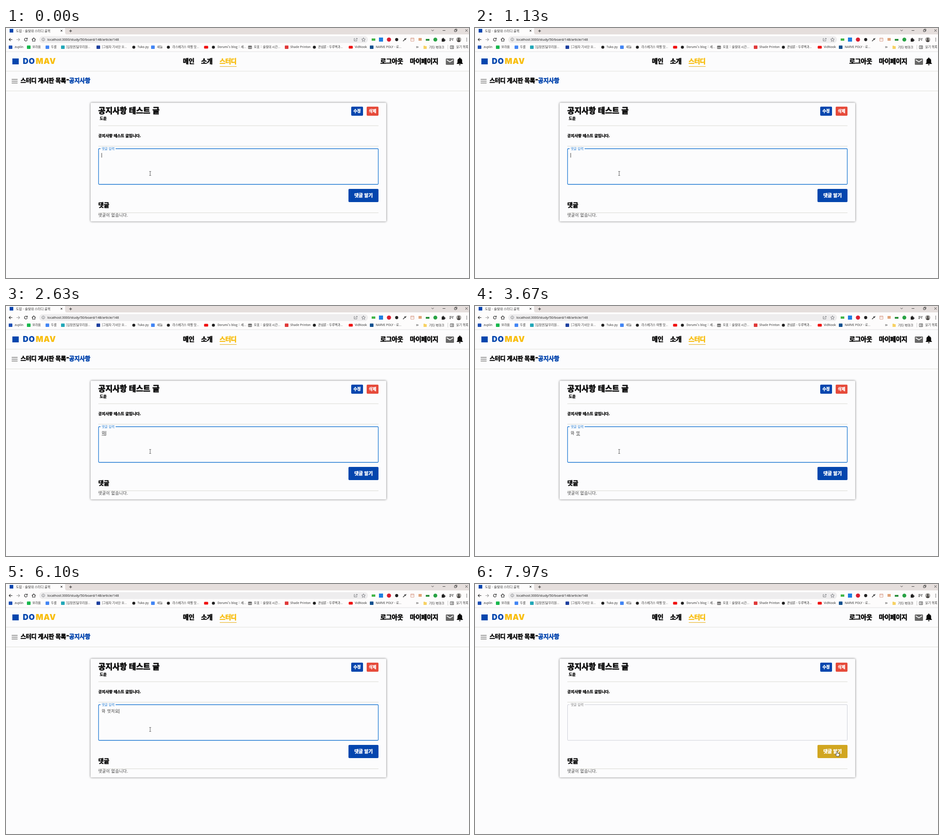
An HTML page that plays this animation: 1018 by 550 pixels, repeating every 8 s.

```html
<!DOCTYPE html>
<html lang="ko">
<head>
<meta charset="utf-8">
<title>스터디 게시판</title>
<style>
html, body { margin: 0; width: 100%; height: 100%; overflow: hidden; background: #fcfcfd; }
svg { display: block; width: 100vw; height: 100vh; }
text { font-family: "Noto Sans CJK KR", "Noto Sans CJK", sans-serif; white-space: pre; }
.url { font-family: "Noto Sans", sans-serif; }
.brand { font-family: Inter, sans-serif; }
.card { filter: drop-shadow(0 0 2.2px rgba(0, 0, 0, .55)); }
</style>
</head>
<body>
<svg id="stage" viewBox="0 0 1018 550"></svg>
<script>
const stage = document.getElementById('stage');
const BLUE = '#0446ae', GOLD = '#f8bd0c', INK = '#0c0c0c', GREY = '#5f6368';

function add(tag, attrs, parent = stage) {
  const el = document.createElementNS('http://www.w3.org/2000/svg', tag);
  for (const k in attrs) el.setAttribute(k, attrs[k]);
  parent.appendChild(el);
  return el;
}
const rect = (x, y, width, height, fill, rx = 0, more) => add('rect', { x, y, width, height, fill, rx, ...more });
const dot = (cx, cy, r, fill) => add('circle', { cx, cy, r, fill });
const path = (d, stroke, width = 1, fill = 'none', parent) => add('path', { d, stroke, 'stroke-width': width, fill }, parent);
// y is the middle of the line of text
function label(x, y, str, size, fill = INK, weight = 400, gap = 0, more) {
  const el = add('text', { x, y: y + size * .37, 'font-size': size, fill, 'font-weight': weight, 'letter-spacing': gap, ...more });
  el.textContent = str;
  return el;
}
// display lettering, thickened with an outline
const heavy = (x, y, str, size, fill = INK, gap = 0) =>
  label(x, y, str, size, fill, 900, gap, { stroke: fill, 'stroke-width': size * .05, 'stroke-linejoin': 'round' });

function drawBrowser() {
  rect(0, 0, 1018, 52, '#fdfcfc');
  path('M130 0H1018V14H134Q130 14 130 10Z', 'none', 0, '#e5dedc');
  rect(8, 2, 8, 8, BLUE);
  label(22, 6, '도맙 - 솔빛대 스터디 골목', 7.1, '#333');
  path('M120 4l4 4m0-4l-4 4M139 6.500h6m-3-3v6', '#222', 1);
  path('M935.500 4l2.500 2.500 2.500-2.500M960 5.500h6M986 4h4v4h-4zM987.500 4v-1.500h4v4h-1.500M1010 3l5 5m0-5l-5 5', '#333', .9);

  path('M14 25.500H7m3-3.200l-3.200 3.200 3.200 3.200', '#222', 1.1);
  path('M23 25.500h7m-3-3.200l3.200 3.200-3.200 3.200', '#999', 1.1);
  path('M46 23.200a3.200 3.200 0 1 0 .8 3M47 21.500v2.800h-2.800', '#222', 1.1);
  path('M57 25.500l4-3.700 4 3.700M58.300 25v4h5.400v-4', '#222', 1.1);
  rect(73, 18, 723, 15, '#eeedee', 7.5);
  path('M82 22a3.200 3.200 0 1 0 .01 0M82 24.800v2.200M82 23.400v.7', GREY, .8);
  label(91, 25, 'localhost:3000/study/50/board/148/article/148', 7.2, '#222', 400, 0, { class: 'url' });
  path('M767 23h-1.500v5.500h6v-2M768 26.500q0-3 4.500-3m-1.800-1.800l2 1.800-2 1.800', GREY, .8);
  path('M786 21.500l1.200 2.700 2.900.3-2.200 2 .7 2.900-2.600-1.500-2.600 1.500.7-2.900-2.200-2 2.900-.3z', GREY, .8);

  rect(804, 23, 8, 5, '#43b649');
  rect(820, 21, 9, 9, '#1f7fe0');
  dot(842, 25.500, 4.600, '#d81f32');
  dot(859, 25.500, 3.400, '#222');
  path('M873 29l4-4M876 23l3 3M878 24.500l2-2', '#333', 1.500);
  path('M890 22h7v7h-7zM890 24h7', '#d79a85', 1);
  rect(907, 22, 7, 6, '#e0a479');
  rect(923, 24, 8, 4, '#2b8f3c');
  dot(944, 25.500, 4.300, '#27a243');
  path('M958 23.500h2q-.5-2 1.200-2t1.200 2h2v2q2-.4 2 1.200t-2 1.200v2h-6.400z', 'none', 0, '#222');
  path('M975 23h5m-5 2.300h5m-5 2.300h3M982 28v-5h2', '#333', 1.1);
  dot(995.500, 25.500, 5.500, '#a9a7a4');
  dot(995.500, 24, 2, '#4a4644');
  path('M992 29.700q0-3.500 3.500-3.500t3.500 3.500q-3.500 2.400-7 0', 'none', 0, '#4a4644');
  for (const y of [22.5, 25.5, 28.5]) dot(1013, y, .85, '#333');
}

function drawBookmarks() {
  const RED = '#f00d0d', BLACK = '#222';
  const marks = [
    [10, '#1d4fb5', 19, 'zuplin'], [50, '#16b74c', 58, '보라움'], [91, '#4285f4', 99, '두룸'],
    [125, '#22a7b8', 132, '[입장권]달무리원...'], [203, '#1d3f9e', 211, '[그림자 기사단 오...'],
    [281, BLACK, 289, 'Tuko.py'], [323, '#4285f4', 332, '새늘'], [357, BLACK, 366, '라스베가스 여행 맛...'],
    [440, RED, 0, ''], [456, BLACK, 465, 'Dorumi\'s blog :: 세...'], [536, '', 545, '모표 :: 솔빛대 시간...'],
    [617, '#e03838', 625, 'Shade Printon'], [678, BLACK, 686, '관념론 - 두루백과...'],
    [758, RED, 767, 'VidNook'], [804, '#12508f', 813, 'NARVE POLY - 로...']
  ];
  for (const [ix, fill, x, name] of marks) {
    if (!fill) path('M533 39.500h7v6h-7zM533 41.500h7M535.300 39v6.500M537.700 39v6.500', '#333', .9);
    else if (fill === RED) rect(ix - 4.500, 39.300, 9, 6, fill, 1.5);
    else if (fill === BLACK) dot(ix, 42.300, 3.300, fill);
    else rect(ix - 4, 38.500, 8, 7.500, fill, 1);
    label(x, 42, name, 6.7, '#333');
  }
  path('M902 40l2 2-2 2M904.500 40l2 2-2 2', '#222', .9);
  path('M918 39h3l1 1h3v6h-7z', 'none', 0, '#f7d264');
  label(930, 42, '기타 북마크', 6.9, '#333');
  path('M971.500 37v10', '#ccc', 1);
  path('M977 39h7v6.500h-7zM979 41h4M979 43.300h4', '#333', .9);
  label(990, 42, '읽기 목록', 6.7, '#333');
  rect(0, 51.500, 1018, 1, '#dfe0e2');
}

function drawPage() {
  rect(14, 67, 14, 13, BLUE);
  const logo = { class: 'brand' };
  label(37, 73, 'DO', 17, BLUE, 900, .8, logo);
  label(65.500, 73, 'MAV', 17, GOLD, 900, 1, logo);
  heavy(389, 73, '메인', 14, INK, -.4);
  heavy(429, 73, '소개', 14, INK, -.4);
  heavy(469.500, 73, '스터디', 14, GOLD, -.45);
  rect(470, 84, 37, 1.2, '#e8b62c');
  heavy(823, 73, '로그아웃', 14, INK, -.4);
  heavy(888, 73, '마이페이지', 14, INK, -.45);
  rect(967, 67, 18, 14, '#686868', 1.500);
  path('M969 70l7 4.500 7-4.500', '#fff', 1.500);
  path('M991 79v-1l1.700-1.700v-4.500q0-4 3.800-4.800v-.7q0-1.300 1.300-1.300t1.300 1.300v.7q3.800.8 3.800 4.800v4.500l1.700 1.700v1zM996 80h3.600q-.2 2-1.800 2t-1.800-2', 'none', 0, '#080808');
  rect(0, 94.500, 1018, 1, '#e0e0dc');
  path('M12.500 113h13M12.500 117h13M12.500 121h13', '#777', 1.3);
  heavy(32, 115.500, '스터디 게시판 목록', 13, INK, -.3);
  heavy(132.500, 114, '-', 17);
  heavy(138.500, 115.500, '공지사항', 13, BLUE, -.3);
  rect(0, 138, 1018, 1, '#deded9');

  rect(186, 164.500, 650, 261, '#fcfcfd', 2, { class: 'card' });
  heavy(203, 182, '공지사항 테스트 글', 17);
  heavy(206, 199, '도윤', 8.3);
  rect(759, 173, 26, 20, BLUE, 2);
  heavy(764, 183, '수정', 8.7, '#fff');
  rect(793, 173, 26, 20, '#e64b3b', 2);
  heavy(798, 183, '삭제', 8.7, '#fff');
  for (const y of [214.5, 259.5, 406]) rect(203, y, 616, 1, '#d9d9d2');
  heavy(203, 236.500, '공지사항 테스트 글입니다.', 8.5);
  heavy(203, 389.500, '댓글', 13);
  label(203, 411.500, '댓글이 없습니다.', 8.7, '#333', 400, .55);
}

drawBrowser();
drawBookmarks();
drawPage();

const field = path('M241 265.500H817Q818.500 265.500 818.500 267V342.500Q818.500 344 817 344H205Q203.500 344 203.500 342.500V267Q203.500 265.500 205 265.500H208', '#1976d2', 1.3);
const fieldName = label(210.500, 265, '댓글 입력', 7.1);
const typed = label(210.500, 280, '', 8.7, '#333', 400, .4, { 'word-spacing': .9 });
const under = rect(0, 284.300, 8, .8, '#444');
const caret = rect(0, 275, 1, 10, '#444');
const button = rect(753, 354, 66, 29, BLUE, 2);
heavy(766, 368.500, '댓글 달기', 10.2, '#fff');

const cursors = {
  beam: path('M-2-4.500h1.500l.5.500.5-.5H2M0-4V4M-2 4.500h1.500l.5-.5.5.5H2', '#444', .9),
  arrow: path('M0 0V10l2.400-2.200 1.600 3.600 1.500-.7-1.500-3.400h3.200z', '#222', .7, '#fff'),
  hand: path('M-1 1Q-1 0 0 0T1 1V4.300l3 .6q1.300.3 1.200 1.800L4.600 11H-.6L-3.600 7q-.5-1.200.7-1.200L-1 7z', '#222', .8, '#fff')
};

const KEYS = [
  [70, ''], [1430, 'ㅇ'], [1510, '오'], [1600, '오ㅎ'], [1670, '오하'], [2020, '오ㅎ'], [2140, '오'],
  [2290, ''], [2400, 'ㅇ'], [2500, '오'], [2600, '와'], [2750, '와 '], [2880, '와 ㅁ'], [2990, '와 머'],
  [3120, '와 멋'], [3960, '와 멋ㅈ'], [4200, '와 멋저'], [4800, '와 멋저ㅇ'], [5040, '와 멋저요'],
  [6800, '와 멋저요!'], [7930, '']
];
const MOVES = [
  [7330, 317, 320], [7430, 455, 330], [7530, 690, 345], [7610, 818, 352], [7660, 825, 357],
  [7730, 810.5, 361], [7850, 798, 367], [7940, 796, 368]
];
const LOOP = 8000, BLINK = 530, HOVER = 7688, BLUR = 7900, COMMIT = 5080;

function pointer(t) {
  if (t <= MOVES[0][0]) return MOVES[0].slice(1);
  const i = MOVES.findIndex(m => m[0] > t);
  if (i < 0) return MOVES[MOVES.length - 1].slice(1);
  const [t0, x0, y0] = MOVES[i - 1], [t1, x1, y1] = MOVES[i];
  const k = (t - t0) / (t1 - t0);
  return [x0 + (x1 - x0) * k, y0 + (y1 - y0) * k];
}

// cubic-bezier(.4, 0, .2, 1)
function ease(p) {
  if (p <= 0) return 0;
  if (p >= 1) return 1;
  let lo = 0, hi = 1;
  for (let i = 0; i < 16; i++) {
    const u = (lo + hi) / 2, v = 1 - u;
    if (3 * v * v * u * .4 + 3 * v * u * u * .2 + u * u * u < p) lo = u; else hi = u;
  }
  return lo * lo * (3 - 2 * lo);
}

const mix = (a, b, k) => `rgb(${a.map((v, i) => Math.round(v + (b[i] - v) * k))})`;
const show = (el, on) => el.setAttribute('visibility', on ? 'visible' : 'hidden');

function render(t) {
  const [since, str] = KEYS.filter((k, i) => !i || k[0] <= t).pop();
  const focused = t < BLUR;
  if (typed.textContent !== str) typed.textContent = str;
  const n = str.length;
  const end = 210.500 + (n ? typed.getSubStringLength(0, n) : 0);
  const start = 210.500 + (n > 1 ? typed.getSubStringLength(0, n - 1) : 0);
  caret.setAttribute('x', Math.round(end - .3));
  show(caret, focused && Math.floor(Math.max(0, t - since) / BLINK) % 2 === 0);
  show(under, n && str[n - 1] !== ' ' && t < COMMIT);
  under.setAttribute('x', start);
  under.setAttribute('width', Math.max(0, end - start));

  field.setAttribute('stroke', focused ? '#1976d2' : '#c6c8d3');
  field.setAttribute('stroke-width', focused ? 1.3 : .9);
  fieldName.setAttribute('fill', focused ? '#1976d2' : '#777');
  button.setAttribute('fill', mix([4, 70, 174], [209, 166, 32], ease((t - HOVER) / 250)));

  const [x, y] = pointer(t);
  const kind = t >= HOVER ? 'hand' : x < 819 && y < 344 ? 'beam' : 'arrow';
  for (const k in cursors) {
    show(cursors[k], k === kind);
    cursors[k].setAttribute('transform', `translate(${x} ${y})`);
  }
}

const begin = performance.now();
function tick() {
  render((performance.now() - begin) % LOOP);
  requestAnimationFrame(tick);
}
tick();
</script>
</body>
</html>
```
